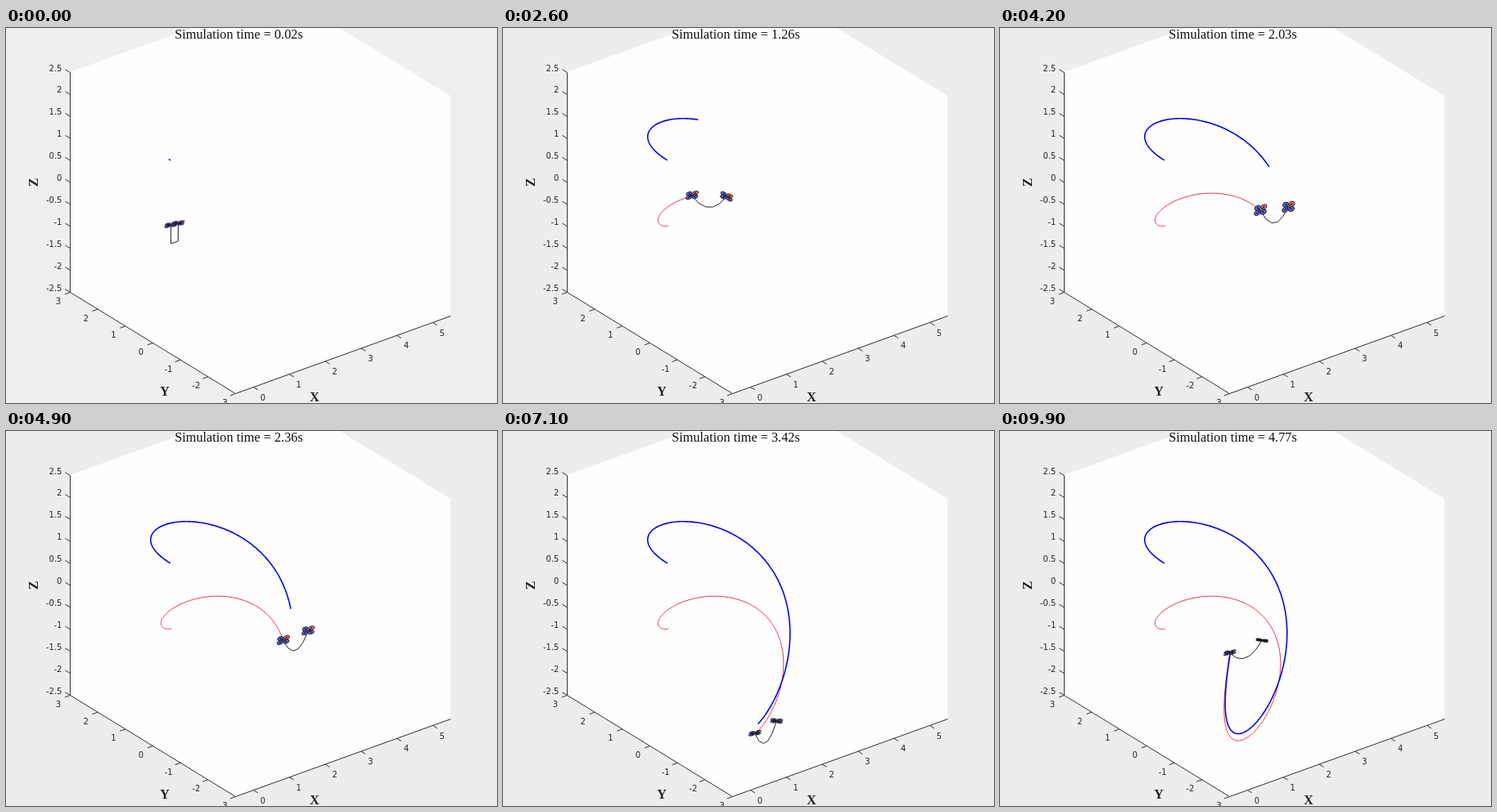
An HTML page that plays this animation: 600 by 459 pixels, repeating every 10000 ms.

```html
<!DOCTYPE html>
<html lang="en">
<head>
<meta charset="utf-8">
<title>Two drones with a cable</title>
<style>
  html, body { margin: 0; width: 100%; height: 100%; overflow: hidden; background: #eee; }
  svg { display: block; width: 100vw; height: 100vh; }
  .tick { font: 10px "DejaVu Sans", sans-serif; fill: #262626; text-anchor: middle; }
  .tick.z { text-anchor: end; }
  .serif { font: 16.3px "Liberation Serif", serif; fill: #111; text-anchor: middle; }
  .axis { font-size: 16px; font-weight: bold; fill: #222; }
  .line { fill: none; stroke-linejoin: round; }
  .drone * { stroke: #111; stroke-width: .9; vector-effect: non-scaling-stroke; }
</style>
</head>
<body>
<svg viewBox="0 0 600 459">
  <rect id="back" width="600" height="459"/>
  <path id="box" fill="#fefefe"/>
  <path id="axes" class="line" stroke="#333" transform="translate(.5 .5)"/>
  <g id="labels"></g>
  <text class="serif axis" transform="translate(39 189) rotate(-90)">Z</text>
  <text class="serif axis" x="194" y="450">Y</text>
  <text class="serif axis" x="377" y="457">X</text>
  <text id="title" class="serif" x="284.5" y="13"></text>
  <path id="flown" class="line" stroke="#e0354a"/>
  <path id="planned" class="line" stroke="#0808e0" stroke-width="1.6"/>
  <path id="cable" class="line" stroke="#222"/>
  <g id="drones"></g>
</svg>
<script>
const NS = 'http://www.w3.org/2000/svg';
const TURN = 2 * Math.PI;
const CABLE = 52;
const $ = id => document.getElementById(id);

function add(parent, name, attrs, text = '') {
  const node = document.createElementNS(NS, name);
  for (const key in attrs) node.setAttribute(key, attrs[key]);
  node.textContent = text;
  return parent.appendChild(node);
}

const project = (x, y, z) => [
  200.9 + 43.83 * x - 33.67 * y,
  242.6 - 15.83 * x - 20.67 * y - 53.8 * z
];
const toPath = points => 'M' + points.map(p => p.map(n => n.toFixed(2)).join(' ')).join('L');
const bump = (t, center, width) => Math.exp(-(((t - center) / width) ** 2));
const ease = u => {
  u = Math.min(1, Math.max(0, u));
  return u * u * (3 - 2 * u);
};

// Desired path: one sinusoid per axis, with periods of 4, 5 and 7 seconds.
const planned = t => project(
  2 * (1 - Math.cos(TURN * t / 4)),
  2.5 * Math.sin(TURN * t / 5),
  1.5 * Math.cos(TURN * t / 7)
);

// Flown path: starts at rest in the origin, its tracking error dies away.
function flown(t) {
  const [x, y] = planned(t), decay = Math.exp(-1.7 * t);
  return [
    x + (135 * t - 148 * t * t) * decay,
    y + (80 + 201 * t + 290 * t * t) * decay
  ];
}

// Second drone relative to the first: it moves off, then sways.
function separation(t) {
  const away = ease(t / .8);
  const x = 35 + 9 * Math.cos(1.3 * (t - .75));
  const y = -16 + 21 * bump(t, 1.55, .6);
  return [9 + (x - 9) * away, -3 + (y + 3) * away];
}

function trail(curve, end) {
  const points = [];
  for (let t = 0; t < end; t += .02) points.push(curve(t));
  return toPath([...points, curve(end)]);
}

// The cable keeps its length, so it sags more when the drones are close.
function hang([x, y], [dx, dy], t) {
  const drop = .9 * Math.sqrt(Math.max(0, CABLE ** 2 - dx * dx - dy * dy)) / 2;
  const slack = Math.max(0, 1 - t / .4);
  return Array.from({ length: 6 }, (_, i) => {
    const u = i / 5, along = u + (Math.round(u) - u) * slack;
    return [x + dx * along, y + dy * along + drop * 4 * u * (1 - u)];
  });
}

function buildAxes() {
  const corners = [
    [-.5, 3, 2.5], [5.5, 3, 2.5], [5.5, -3, 2.5], [5.5, -3, -2.5], [-.5, -3, -2.5], [-.5, 3, -2.5]
  ].map(c => project(...c));
  $('box').setAttribute('d', toPath(corners) + 'Z');
  let d = toPath([corners[0], corners[5], corners[4], corners[3]]);

  function tick(value, from, to, kind, dx, dy) {
    const start = project(...from);
    d += toPath([start, project(...to)]);
    add($('labels'), 'text', { class: 'tick ' + kind, x: start[0] + dx, y: start[1] + dy }, value);
  }
  for (let z = -2.5; z <= 2.5; z += .5) tick(z, [-.5, 3, z], [-.5, 3.18, z], 'z', -9.5, -1.5);
  for (let y = -3; y <= 3; y++) tick(y, [-.5, y, -2.5], [-.65, y, -2.5], 'y', -14, 15);
  for (let x = 0; x <= 5; x++) tick(x, [x, -3, -2.5], [x, -3.16, -2.5], 'x', 12, 16.7);
  $('axes').setAttribute('d', d);
}

function buildDrone() {
  const group = add($('drones'), 'g', { class: 'drone' });
  const rotors = [];
  for (const x of [-3.8, 3.8]) for (const y of [-3.8, 3.8]) {
    const node = add(group, 'circle', { cx: x, cy: y, r: 3.6 });
    rotors.push({ node, color: x > 0 && y < 0 ? '#f07474' : '#6464ee' });
    add(group, 'path', { d: `M0 0L${x} ${y}` });
    add(group, 'circle', { cx: x, cy: y, r: .6 });
  }
  return { group, rotors };
}

// Skew leans the frame sideways, height is how far it is seen from above.
function poseDrone({ group, rotors }, x, y, skew, height) {
  group.setAttribute('transform', `matrix(1 ${skew} -.08 ${height} ${x} ${y})`);
  for (const { node, color } of rotors) node.setAttribute('fill', height < .23 ? '#222' : color);
}

buildAxes();
const drones = [buildDrone(), buildDrone()];

function render(ms) {
  const step = Math.floor(ms / 100) % 100;
  const t = Math.max(.02, .0482 * step + .002);
  const [x, y] = flown(t), [dx, dy] = separation(t);
  const height = .35 + .5 * bump(t, 1.85, .75);

  $('back').setAttribute('fill', step < 23 ? '#efeef0' : '#edeeec');
  $('title').textContent = `Simulation time = ${t.toFixed(2)}s`;
  $('planned').setAttribute('d', trail(planned, t));
  $('flown').setAttribute('d', trail(flown, t));
  $('cable').setAttribute('d', toPath(hang([x, y], [dx, dy], t)));
  poseDrone(drones[0], x, y - 1,
    -.17 + .4 * bump(t, .82, .3),
    height - .2 * bump(t, 4.05, .3));
  poseDrone(drones[1], x + dx, y + dy,
    -.15 + .6 * bump(t, 1, .6) + .3 * ease((t - 2.2) / 1.8),
    height - .2 * bump(t, .85, .35) - .15 * ease((t - 3.3) / .7));
}

const start = performance.now();
function loop() {
  render(performance.now() - start);
  requestAnimationFrame(loop);
}
loop();
</script>
</body>
</html>
```
